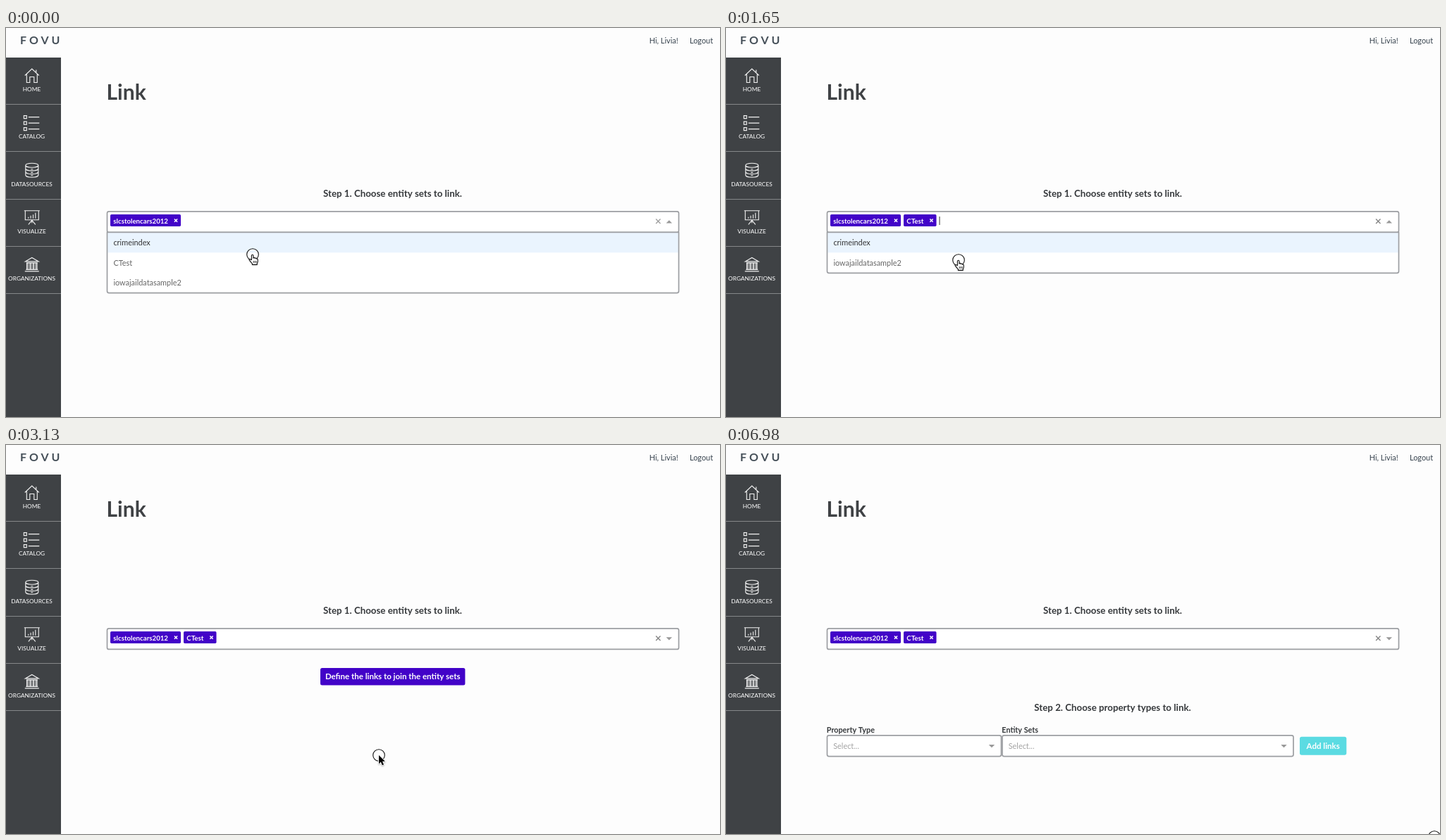
Recreate the animation shown at these times as an HTML page with a canvas. Size 1013x553 px, loop 7080 ms.

```html
<!DOCTYPE html>
<html lang="en">
<head>
<meta charset="utf-8">
<title>Link</title>
<style>
html, body { margin: 0; width: 100%; height: 100%; overflow: hidden; background: #fdfdfd; }
canvas { display: block; width: 1013px; height: 553px; }
</style>
</head>
<body>
<canvas id="stage"></canvas>
<script>
const W = 1013, H = 553, LOOP = 7080;
const canvas = document.getElementById('stage');
const dpr = window.devicePixelRatio || 1;
canvas.width = W * dpr;
canvas.height = H * dpr;
const ctx = canvas.getContext('2d');
ctx.scale(dpr, dpr);

const PURPLE = '#4203c8', GREY = '#9c9ea2', DARK = '#3f4245', BG = '#fdfdfd';

const TICKS = [0, 150, 300, 450, 750, 900, 1050, 1200, 1350, 1650, 1800, 1950,
  2400, 2550, 2700, 2850, 3000, 3150, 3290, 3430, 3580, 3720, 3870, 4020,
  5060, 5510, 5660, 5800, 5950, 6090, 6240, 6840, 6980];

// Pointer hot spot: time, x, y
const PATH = [
  [0, 350, 322], [600, 350, 322], [1050, 332, 322], [1200, 330, 330],
  [2250, 330, 330], [2550, 491, 436], [2700, 525.5, 441], [3000, 529, 441],
  [3430, 544, 345], [3580, 544, 329], [4020, 544, 329], [5060, 543, 329],
  [5360, 543, 329], [6240, 964, 538], [6700, 964, 538], [6840, 1005, 557],
  [LOOP, 1005, 557]
];

const within = (t, ...spans) => spans.some(([a, b]) => t >= a && t < b);

function pointerAt(t) {
  const i = PATH.findIndex(p => p[0] > t);
  const [t0, x0, y0] = PATH[i - 1], [t1, x1, y1] = PATH[i];
  const u = (t - t0) / (t1 - t0), k = u * u * (3 - 2 * u);
  return [x0 + (x1 - x0) * k, y0 + (y1 - y0) * k];
}

function text(str, x, y, size, color, weight = 400, align = 'left') {
  ctx.font = `${weight} ${size}px Lato, sans-serif`;
  ctx.textAlign = align;
  ctx.fillStyle = color;
  ctx.fillText(str, x, y);
}

function rect(x, y, w, h, fill) {
  ctx.fillStyle = fill;
  ctx.fillRect(x, y, w, h);
}

function box(x, y, w, h, r, fill, stroke, width = 1.7) {
  ctx.beginPath();
  ctx.roundRect(x, y, w, h, r);
  if (fill) { ctx.fillStyle = fill; ctx.fill(); }
  if (stroke) { ctx.strokeStyle = stroke; ctx.lineWidth = width; ctx.stroke(); }
}

function lines(d, x = 0, y = 0, width = 1.1) {
  ctx.save();
  ctx.translate(x, y);
  ctx.strokeStyle = '#f2f2f2';
  ctx.lineWidth = width;
  ctx.stroke(new Path2D(d));
  ctx.restore();
}

function caretIcon(x, y, up) {
  const s = up ? -1 : 1;
  ctx.beginPath();
  ctx.moveTo(x - 4.2, y - 2.1 * s);
  ctx.lineTo(x + 4.2, y - 2.1 * s);
  ctx.lineTo(x, y + 2.1 * s);
  ctx.fillStyle = '#999';
  ctx.fill();
}

function cross(x, y, r, color, width) {
  ctx.beginPath();
  ctx.moveTo(x - r, y - r); ctx.lineTo(x + r, y + r);
  ctx.moveTo(x + r, y - r); ctx.lineTo(x - r, y + r);
  ctx.strokeStyle = color;
  ctx.lineWidth = width;
  ctx.stroke();
}

const ICONS = [
  ['HOME', 'M-10 -.5 L0 -10 L10 -.5 M-7.5 -2.5 V9.5 H-3 V1.5 H3 V9.5 H7.5 V-2.5 M6 -8.5 V-5'],
  ['CATALOG', [-8.5, 0, 8.5].map(y => `M-11.5 ${y - 2} h4 v4 h-4 z M-5 ${y} H10.5`).join('')],
  ['DATASOURCES', 'M-9 -7 a9 3 0 0 1 18 0 a9 3 0 0 1 -18 0 V7 a9 3 0 0 0 18 0 V-7' +
    [-2.3, 2.4].map(y => `M-9 ${y} a9 3 0 0 0 18 0`).join('') +
    [-1.5, 3.2, 7.6].map(y => `M-1.5 ${y} h3`).join('')],
  ['VISUALIZE', 'M-11 -9.5 H11 M-9.5 -9.5 V3.5 H9.5 V-9.5 M0 3.5 V8 M0 4 L-5 10 M0 4 L5 10' +
    'M-5 1.5 v-2 M-1.7 1.5 v-4 M1.7 1.5 v-5.5 M5 1.5 v-8'],
  ['ORGANIZATIONS', 'M-9.5 -4.5 L0 -10 L9.5 -4.5 Z M-8 -2.5 H8 M-8.5 7 H8.5 M-10 9.5 H10' +
    [-6.5, -2.2, 2.2, 6.5].map(x => `M${x - .8} -2.5 V7 M${x + .8} -2.5 V7`).join('')]
];

function shell() {
  rect(0, 0, W, H, BG);
  ctx.letterSpacing = '4px';
  text('FOVU', 20, 23.3, 16, '#465059', 700);
  ctx.letterSpacing = '0px';
  text('Hi, Livia!', 912.7, 22, 10.9, '#36424d');
  text('Logout', 970, 22, 10.9, '#36424d');

  rect(0, 42, 78, H - 42, DARK);
  ICONS.forEach(([label, d], i) => {
    const y = 68 + i * 67.1;
    lines(d, 36.8, y);
    text(label, 36.5, y + 22.3, 8.3, '#fff', 400, 'center');
    rect(0, Math.round(y + 40.3), 78, 1, '#858789');
  });

  text('Link', 142.5, 102, 30, DARK, 700);
  text('Step 1. Choose entity sets to link.', 548.5, 240, 13.3, '#36393c', 700, 'center');
}

function tag(label, x, w) {
  box(x, 265, w, 17, 1.7, PURPLE);
  text(label, x + 4.3, 277.6, 9.7, '#fff', 700);
  cross(x + w - 7, 273.6, 2.1, '#fff', 1.5);
}

function picker(t) {
  const open = t < 3000, two = t >= 1650;
  box(143.5, 260.8, 811, 29.6, 2.5, '#fff', GREY);
  tag('slcstolencars2012', 148, 100);
  if (two) tag('CTest', 252, 46.5);
  if (within(t, [150, 750], [1200, 1950], [2400, 2850])) {
    rect(two ? 302.5 : 252.5, 268, 1, 12, '#333');
  }
  cross(925.3, 274.8, 3.2, t < 150 ? '#a0a0a0' : '#858585', 1.4);
  caretIcon(940.8, 275.4, open);
  if (!open) return;

  const rows = two ? ['crimeindex', 'iowajaildatasample2']
                   : ['crimeindex', 'CTest', 'iowajaildatasample2'];
  const active = within(t, [1200, 1650], [2400, 3000]) ? 1 : 0;
  const rowH = 28.3;
  box(143.5, 290.5, 811, rows.length * rowH + 1.2, [0, 0, 2.5, 2.5], '#fff');
  rows.forEach((label, i) => {
    const y = 291 + i * rowH, on = i === active;
    if (on) rect(144.3, y, 809.4, rowH, '#eaf4fe');
    text(label, 152.4, y + 18.2, 10.9, on ? '#333' : '#666');
  });
  box(143.5, 290.5, 811, rows.length * rowH + 1.2, [0, 0, 2.5, 2.5], null, GREY);
}

function defineButton(t) {
  const focus = t >= 3720, hover = t >= 3580;
  if (focus) {
    box(445.2, 316.2, 207, 26, 3, null, '#9cc8fb', 2.4);
    box(446, 317, 205.4, 24.4, 2.5, null, '#3d83ea', 1.4);
  }
  box(446, 317, 205.4, 24.4, 2.5, hover ? '#300092' : PURPLE);
  text('Define the links to join the entity sets', 548.7, 333, 11.5, '#fff', 700, 'center');
}

function selectBox(label, x, w) {
  text(label, x - .7, 408.6, 10.8, '#36393c', 700);
  box(x, 412.8, w, 29.8, 2.5, '#fff', GREY);
  text('Select...', x + 8.7, 431.7, 10.9, '#a3a3a3');
  caretIcon(x + w - 13.5, 428.2, false);
}

function stepTwo() {
  text('Step 2. Choose property types to link.', 548.5, 377.8, 13.3, '#36393c', 700, 'center');
  selectBox('Property Type', 143.5, 247);
  selectBox('Entity Sets', 392, 413);
  box(814, 414.8, 66.3, 26, 2.8, '#5bdbe2');
  text('Add links', 847.2, 431.9, 11.5, '#fff', 700, 'center');
}

const HAND = new Path2D('M-1.6 7.5 V1.6 Q-1.5 .3 -.4 .3 Q.8 .3 .9 1.6 V5.3 Q1 4.2 2.2 4.4' +
  ' Q3.2 4.6 3.3 5.6 Q3.9 4.7 4.8 5.1 Q5.6 5.4 5.6 6.3 Q6.8 5.7 7.2 7 V10 Q7 11.6 6.2 12.6' +
  ' V14.4 H-.6 V13 Q-2.4 11 -4.6 8.2 Q-5.4 7 -4.4 6.5 Q-3.4 6.2 -2.4 7.4 Z');
const KNUCKLES = new Path2D('M1.2 9 V12 M3.1 9 V12 M5 9 V12');
const ARROW = new Path2D('M0 0 V12.2 L2.8 9.6 L4.8 14.2 L7 13.2 L5 8.8 H8.8 Z');

function pointer(t) {
  const [x, y] = pointerAt(t);
  const hand = t < 2550 || within(t, [3580, 5060]);
  ctx.save();
  ctx.translate(x, y);
  ctx.lineJoin = 'round';
  if (within(t, [0, 150], [1650, 1800], [3000, 3150], [3720, 4020], [6980, LOOP])) {
    ctx.beginPath();
    ctx.arc(0, 0, 7.3, 0, 7);
    ctx.strokeStyle = '#fff';
    ctx.lineWidth = 1.4;
    ctx.stroke();
    ctx.beginPath();
    ctx.arc(0, 0, 8.3, 0, 7);
    ctx.strokeStyle = '#111';
    ctx.lineWidth = 1.1;
    ctx.stroke();
  }
  ctx.shadowColor = 'rgba(0,0,0,.3)';
  ctx.shadowBlur = 2;
  ctx.shadowOffsetY = 1;
  if (hand) {
    ctx.fillStyle = '#fff';
    ctx.fill(HAND);
    ctx.shadowColor = 'transparent';
    ctx.strokeStyle = '#111';
    ctx.lineWidth = 1.1;
    ctx.stroke(HAND);
    ctx.lineWidth = .8;
    ctx.stroke(KNUCKLES);
  } else {
    ctx.strokeStyle = '#fff';
    ctx.lineWidth = 1.8;
    ctx.stroke(ARROW);
    ctx.shadowColor = 'transparent';
    ctx.fillStyle = '#000';
    ctx.fill(ARROW);
  }
  ctx.restore();
}

function draw(t) {
  shell();
  picker(t);
  if (within(t, [3000, 4020])) defineButton(t);
  if (t >= 4020) stepTwo();
  pointer(t);
}

const start = performance.now();
function frame() {
  const now = (performance.now() - start) % LOOP;
  draw(TICKS.findLast(k => k <= now));
  requestAnimationFrame(frame);
}
frame();
</script>
</body>
</html>
```
